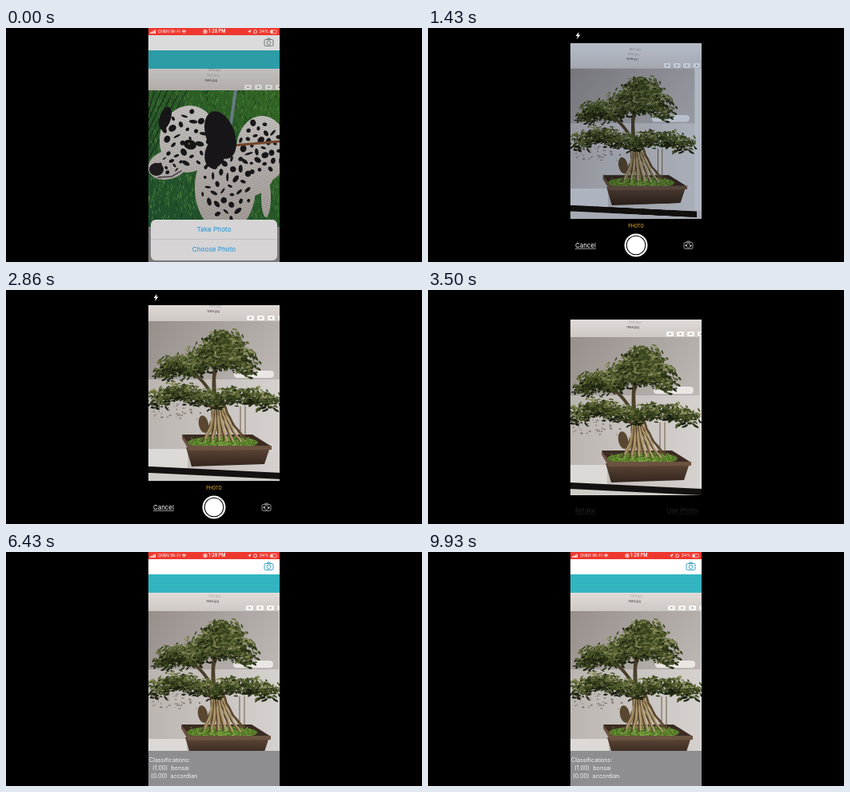
These frames come from a looping animation (520 by 293 pixels, 10 s). An HTML page with a canvas:

```html
<!DOCTYPE html>
<html lang="en">
<head>
<meta charset="utf-8">
<title>Photo classifier demo</title>
<style>
html, body { margin: 0; width: 100%; height: 100%; overflow: hidden; background: #000; }
canvas { display: block; width: 520px; height: 293px; }
</style>
</head>
<body>
<canvas id="stage" width="520" height="293"></canvas>
<script>
const LOOP = 10000, LEFT = 178, WIDTH = 164, HEIGHT = 293;
const stage = document.getElementById('stage').getContext('2d');
let c = stage;

// ---- helpers ----
function rng(seed) {
  return () => {
    seed = seed + 0x6D2B79F5 | 0;
    let n = Math.imul(seed ^ seed >>> 15, 1 | seed);
    n = n + Math.imul(n ^ n >>> 7, 61 | n) ^ n;
    return ((n ^ n >>> 14) >>> 0) / 4294967296;
  };
}
const mix = (a, b, u) => a + (b - a) * u;
function ease(a, b, t) {
  const u = Math.min(1, Math.max(0, (t - a) / (b - a)));
  return u * u * (3 - 2 * u);
}
function rect(color, x, y, w, h, r = 0) {
  c.fillStyle = color;
  c.beginPath(); c.roundRect(x, y, w, h, r); c.fill();
}
function frame(color, width, x, y, w, h, r = 0) {
  c.strokeStyle = color; c.lineWidth = width;
  c.beginPath(); c.roundRect(x, y, w, h, r); c.stroke();
}
function oval(color, x, y, rx, ry = rx, turn = 0) {
  c.fillStyle = color;
  c.beginPath(); c.ellipse(x, y, rx, ry, turn, 0, 7); c.fill();
}
function poly(color, ...p) {
  c.fillStyle = color;
  c.beginPath();
  for (let i = 0; i < p.length; i += 2) c.lineTo(p[i], p[i + 1]);
  c.fill();
}
function line(color, width, ...p) {
  c.strokeStyle = color; c.lineWidth = width;
  c.beginPath();
  for (let i = 0; i < p.length; i += 2) c.lineTo(p[i], p[i + 1]);
  c.stroke();
}
function arc(color, width, x, y, r, from = 0, to = 7) {
  c.strokeStyle = color; c.lineWidth = width;
  c.beginPath(); c.arc(x, y, r, from, to); c.stroke();
}
function text(str, x, y, size, color, align = 'left', weight = 400) {
  c.font = `${weight} ${size}px Inter, sans-serif`;
  c.textAlign = align; c.textBaseline = 'middle';
  c.fillStyle = color; c.fillText(str, x, y);
}
function link(str, x, y, align = 'left') {
  text(str, x, y, 7.9, '#fff', align);
  const w = c.measureText(str).width;
  rect('#ddd', align === 'right' ? x - w : x, y + 3.4, w, .7);
}
function fade(x0, y0, x1, y1, from, to) {
  const g = c.createLinearGradient(x0, y0, x1, y1);
  g.addColorStop(0, from); g.addColorStop(1, to);
  return g;
}
function clipped(x, y, w, h, draw) {
  c.save();
  c.beginPath(); c.rect(x, y, w, h); c.clip();
  draw();
  c.restore();
}
function picture(draw) {
  const canvas = document.createElement('canvas');
  canvas.width = 1040; canvas.height = 600;
  c = canvas.getContext('2d');
  c.scale(2, 2);
  c.lineCap = 'round';
  draw();
  c = stage;
  return canvas;
}

// ---- pictures ----
function windowBar(bottom) {
  rect(fade(0, bottom - 26, 0, bottom, '#e2dedb', '#cfc9c5'), 0, 0, 520, bottom);
  for (let i = 0; i < 3; i++)
    text('1588.jpg', 256 + i * 2, bottom - 12 - i * 6.5, 4, i ? '#aaa5a1' : '#45413f', 'center');
  for (let x = 298; x < 345; x += 13) {
    rect('#f8f6f4', x, bottom - 7, 9, 6, 1.5);
    rect('#a39d99', x + 3.5, bottom - 5, 2, 2, .5);
  }
}

function drawBonsai() {
  const rand = rng(12);
  const spread = () => rand() + rand() - 1;

  // Wall, ledge and table
  rect(fade(178, 60, 320, 150, '#97908c', '#bdb7b3'), 0, 0, 520, 300);
  rect(fade(178, 0, 342, 0, '#bcb6b2', '#d6d2cf'), 0, 132, 520, 120);
  rect('#e9e6e4', 282, 121, 50, 9, 4);
  rect('#dedbd8', 339, 59, 181, 190);
  for (let i = 0; i < 55; i++)
    oval('#80756b', 180 + rand() * 62, 158 + rand() * 24, .4 + rand() * 1.8, .4 + rand() * .8);
  rect('#dcd9d6', 0, 219, 224, 25);
  rect('#d0ccc8', 0, 248, 520, 52);
  poly('#141110', 0, 241, 178, 241, 342, 249, 342, 257, 178, 249, 0, 249);
  windowBar(59);

  // Pot and moss
  poly('#3b2b22', 217, 201, 305, 201, 329, 216, 228, 221);
  oval('#5a7d2b', 268, 211, 44, 8);
  for (let i = 0; i < 220; i++)
    oval(['#76a03b', '#45691f', '#86ad4b'][i % 3], 268 + spread() * 44, 211 + spread() * 8, 1, .8);
  poly(fade(0, 219, 0, 241, '#5a4435', '#34251d'), 222, 217, 327, 217, 320, 238, 229, 241);
  poly('#6b5341', 217, 202, 228, 215, 329, 215, 329, 220, 226, 221, 217, 206);

  // Tiers of foliage: centre and half width, each on its own branch
  const tiers = [[271, 81, 13], [267, 95, 28], [213, 113, 17], [265, 110, 34], [217, 148, 30], [293, 152, 32]];
  for (const [x, y] of tiers) {
    c.strokeStyle = '#4b3e2b'; c.lineWidth = 4;
    c.beginPath(); c.moveTo(260, 168); c.quadraticCurveTo(251, y + 18, x, y); c.stroke();
  }
  // Flared trunk made of ridges
  oval('#594731', 244, 188, 6, 11, -.2);
  for (let i = 0; i <= 18; i++) {
    const k = i / 9 - 1, ridge = [];
    for (let u = 0; u <= 1; u += .1)
      ridge.push(mix(260, 269, u) + k * (7 + 20 * u ** 2.3) + rand() * 1.5, mix(152, 207, u) + 3 * u * Math.cos(i * 2));
    line(['#5a472e', '#8f7a53', '#b09a70'][i * 2 % 3], mix(2, 2.6, rand()), ...ridge);
  }
  for (const x of [290, 296]) line('#6d5b43', 1, x, 166, x, 204);

  const greens = ['#171c0e', '#262e16', '#38431f', '#4d582a', '#697040', '#8d915e'];
  for (const [x, y, half] of tiers)
    for (let k = -1; k <= 1; k += .4) {
      const cx = x + k * half, cy = y + 8 * k * k + spread() * 3;
      for (let i = 0; i < 90; i++) {
        const dx = spread(), dy = spread();
        const tone = Math.floor(rand() * 2 + i / 30 - dy * 2);
        oval(greens[Math.max(0, Math.min(5, tone))], cx + dx * 17, cy + dy * 13,
          1.5 + rand() * 2, .7 + rand() * .6, dx + spread());
      }
    }
}

function drawDog() {
  const rand = rng(5);
  const spots = (n, x, y, rx, ry, size) => {
    for (let i = 0; i < n; i++) {
      const a = i * 2.4, r = Math.sqrt((i + .5) / n);
      oval('#1d1b1e', x + Math.cos(a) * r * rx, y + Math.sin(a) * r * ry,
        size * (.4 + rand()), size * (.3 + rand() * .7), rand() * 3);
    }
  };
  const coat = fade(0, 100, 0, 240, '#e9e5e3', '#c2bab5');

  // Lawn and fence
  rect(fade(178, 240, 300, 80, '#235f38', '#3d7a2d'), 0, 0, 520, 300);
  for (let i = 0; i < 1500; i++) {
    const x = 176 + rand() * 168, y = 78 + rand() * 172;
    line(['#1f4a22', '#4d8e42', '#2d6a2b', '#69a24f'][i % 4], .8, x, y, x + rand() * 4 - 2, y - 4);
  }
  for (let i = 0; i < 7; i++) line('#1f2b20', 1, 178 + i * 8, 78, 178, 92 + i * 12);
  line('#7f95a1', 4, 287, 78, 281, 120);

  // Body
  oval(coat, 320, 152, 32, 42);
  oval(coat, 274, 200, 38, 56);
  oval(coat, 298, 178, 38, 34);
  oval(coat, 325, 212, 6, 25);
  spots(30, 318, 150, 28, 34, 4);
  spots(34, 276, 198, 33, 42, 4);
  line('#8b5634', 3, 284, 147, 342, 142);

  // Head
  oval(coat, 228, 139, 36, 42, .15);
  oval(coat, 203, 171, 26, 18, -.3);
  spots(26, 226, 138, 30, 36, 4);
  spots(8, 206, 172, 18, 10, 2.5);
  oval('#1d1b1e', 199, 113, 7, 15, .3);
  oval('#1d1b1e', 268, 134, 18, 31, -.35);
  oval('#1d1b1e', 262, 156, 13, 20, .3);
  oval('#1c1819', 230, 146, 8, 6, .3);
  oval('#8b7464', 229, 145, 1.2);
  oval('#262124', 188, 177, 9, 8);
  line('#4f4548', 1.5, 190, 187, 207, 186, 219, 179);

  // Screen weave
  for (let y = 0; y < 300; y += 3) line('#0002', 1, 178, y, 342, y + 60);
  windowBar(78);
}

const bonsai = picture(drawBonsai), dog = picture(drawDog);
const place = (img, x, y, scale = 1) => c.drawImage(img, x, y, 520 * scale, 300 * scale);

// ---- app screen ----
function statusBar() {
  rect('#ee382f', LEFT, 0, WIDTH, 9);
  for (let i = 0; i < 4; i++) rect('#fff', 180 + i * 1.9, 5.5 - i, 1.3, 1.5 + i);
  text('QV&N Wi-Fi', 190, 4.7, 5, '#fff');
  for (let r = 1; r < 5; r += 1.4) arc('#fff', .9, 222.5, 6.8, r, -2.35, -.8);
  arc('#fff', .7, 249, 4.5, 2.4);
  oval('#fff', 249, 4.5, 1.3);
  text('1:28 PM', 253, 4.7, 5.6, '#fff', 'left', 600);
  poly('#fff', 302, 4.8, 306.5, 2, 304.6, 7, 304.2, 5);
  arc('#fff', .8, 311.5, 4.7, 2);
  text('34%', 316.5, 4.7, 5.4, '#fff');
  frame('#fff', .6, 330.3, 2.7, 8, 4, 1);
  rect('#fff', 331, 3.4, 2.6, 2.6);
}

function cameraIcon(color, width, x, y, lens) {
  frame(color, width, x - 5.5, y - 4, 11, 8, 1.5);
  line(color, width, x - 2.5, y - 4, x - 1.5, y - 5.5, x + 1.5, y - 5.5, x + 2.5, y - 4);
  arc(color, width, x, y, lens);
}

function actionSheet(t, shown) {
  rect(`rgba(0,0,0,${.14 * shown})`, LEFT, 9, WIDTH, 284);
  const y = 240 + 56 * (1 - shown);
  rect('#d6d4d5', 181, y, 158, 51, 6);
  if (t > 70) rect('#c6c5c6', 181, y, 158, 24, [6, 6, 0, 0]);
  rect('#b9b9bb', 181, y + 24, 158, .7);
  ['Take Photo', 'Choose Photo'].forEach((s, i) => text(s, 260, y + 12.7 + i * 25.3, 8.2, '#2090d6', 'center'));
}

function app(t) {
  const picked = t > 2500, sheet = picked ? 0 : 1 - ease(200, 450, t);
  rect('#33b5c1', LEFT, 0, WIDTH, HEIGHT);
  rect('#fff', LEFT, 9, WIDTH, 19);
  clipped(LEFT, 51, WIDTH, 242, () => picked ? place(bonsai, 2, 15) : place(dog, 0, 0));
  rect('#8e8d90', LEFT, 249, WIDTH, 44);
  if (picked) {
    const lines = t < 5150 ? ['Classifying...'] : ['Classifications:', '  (1.00)  bonsai', ' (0.00)  accordian'];
    lines.forEach((s, i) => text(s, 179, 261 + i * 10, 7.2, '#f4f4f4'));
  }
  cameraIcon(sheet > .5 ? '#85898c' : '#3d9fcb', 1, 328.5, 18.5, 2.4);
  if (sheet > 0) actionSheet(t, sheet);
  statusBar();
}

// ---- camera screen ----
function cameraControls() {
  poly('#fff', 188.5, 5, 184.5, 10, 187, 10, 186, 14, 190.5, 8.5, 188, 8.5);
  text('PHOTO', 260, 248.3, 5.5, '#d8aa24', 'center', 500);
  link('Cancel', 184, 272.5);
  [14.5, 12.3, 11.2].forEach((r, i) => oval(i === 1 ? '#000' : '#fff', 260, 272, r));
  cameraIcon('#b5b5b5', .8, 325.5, 272.5, 2.6);
  poly('#ddd', 327, 272, 330, 272, 328.5, 274);
  poly('#ddd', 321, 273, 324, 273, 322.5, 271);
}

function camera(t) {
  rect('#000', LEFT, 0, WIDTH, HEIGHT);
  const settle = ease(1000, 1750, t), drift = ease(2200, 2860, t), slide = ease(3290, 3480, t);
  const exposure = 1 + .35 * (ease(1300, 1800, t) - drift);
  const wake = ease(600, 1000, t), clear = ease(1000, 1700, t);
  const tint = [62, 92, 138].map(v => mix(v * mix(.2, 1, wake), 255, clear));
  clipped(LEFT, 19 + 18 * slide, WIDTH, 220, () => {
    c.filter = `brightness(${exposure})`;
    place(bonsai, mix(28.5, 5, settle) - 2 * drift - 3 * slide,
      mix(14, -17, settle) - 3 * drift + 20 * slide, mix(.85, 1, settle));
    c.filter = 'none';
    c.globalCompositeOperation = 'multiply';
    rect(`rgb(${tint})`, LEFT, 19, WIDTH, 240);
  });
  c.globalAlpha = 1 - ease(3290, 3450, t);
  cameraControls();
  const shown = ease(3400, 3830, t);
  c.globalAlpha = shown;
  link('Retake', 184, 277);
  c.globalAlpha = t > 4290 ? shown * .4 : shown;
  link('Use Photo', 337, 277, 'right');
  c.globalAlpha = 1;
}

function render(t) {
  rect('#000', 0, 0, 520, HEIGHT);
  clipped(LEFT, 0, WIDTH, HEIGHT, () => {
    app(t);
    if (t > 400 && t < 4900) {
      c.translate(0, HEIGHT * (1 - ease(400, 850, t) + ease(4430, 4900, t)));
      camera(t);
    }
  });
}

const start = performance.now();
function tick() {
  render((performance.now() - start) % LOOP);
  requestAnimationFrame(tick);
}
tick();
</script>
</body>
</html>
```
